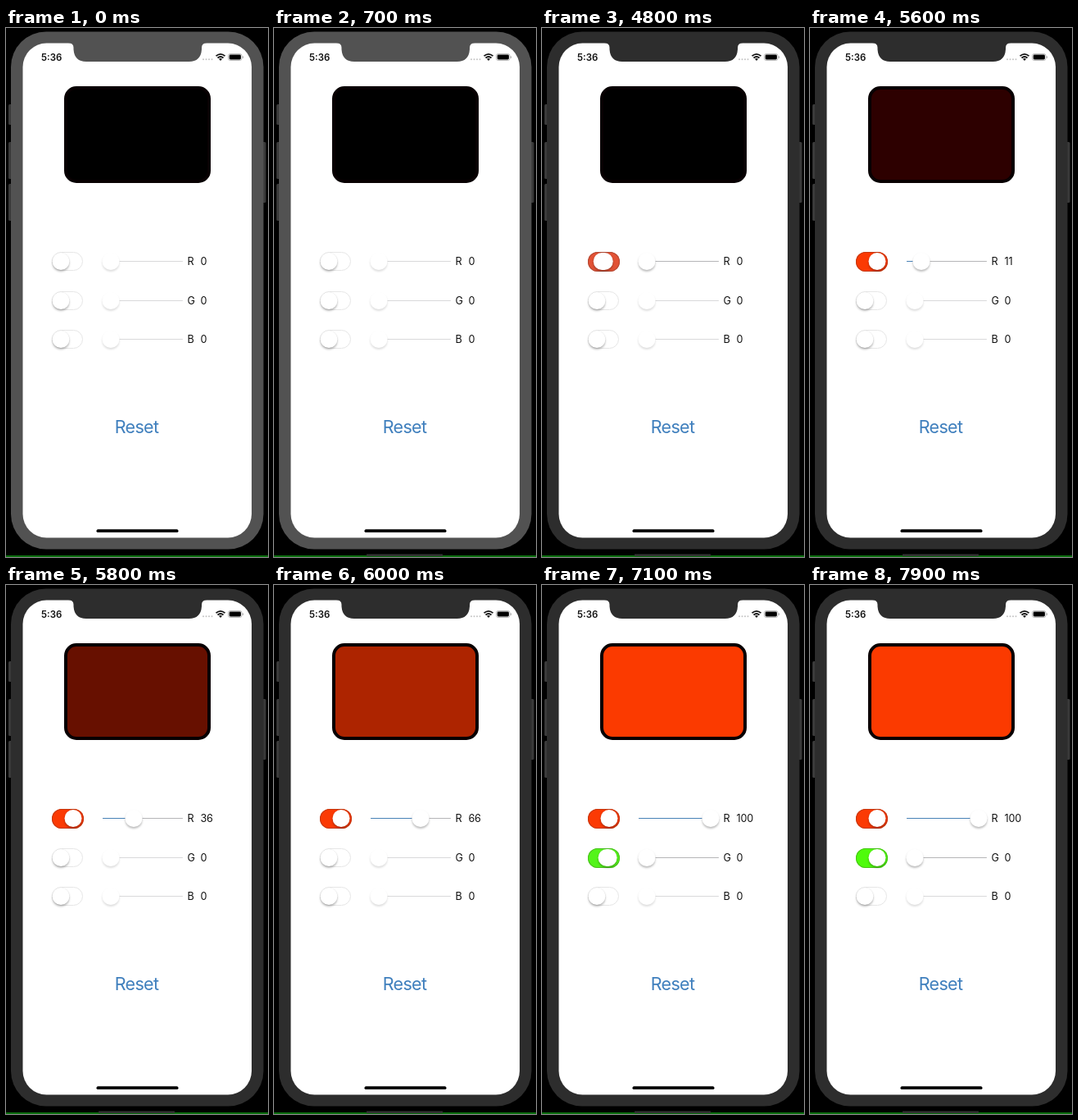
Write an HTML page without scripts that moves like this. It is 320 by 645 pixels and loops after 8 s.

```html
<!DOCTYPE html>
<html lang="en">
<head>
<meta charset="utf-8">
<title>Colour mixer</title>
<style>
/* --v: slider value, --p: switch progress */
@property --v { syntax: "<integer>"; inherits: true; initial-value: 0; }
@property --p { syntax: "<number>"; inherits: true; initial-value: 0; }

html, body { margin: 0; width: 100%; height: 100%; overflow: hidden; background: #000; }
.stage {
  position: relative; width: 320px; height: 645px; overflow: hidden;
  font-family: Inter, Roboto, "Liberation Sans", sans-serif; color: #111;
  animation: drag 8s step-end infinite;
}
.stage *, .stage ::before { position: absolute; box-sizing: border-box; }
svg { left: 0; top: 0; }
.body { animation: dim 8s step-end infinite; }
.dock { animation: appear 8s step-end infinite; }

.time { left: 43px; top: 26px; font-weight: 600; font-size: 11.5px; line-height: 20px; }
.reset {
  left: 20px; width: 279px; top: 471px; text-align: center; color: #3f7fbd;
  font-size: 21.5px; line-height: 30px; letter-spacing: -.7px;
}
.preview {
  left: 70.5px; top: 71px; width: 179px; height: 118px;
  border: 4px solid #080002; border-radius: 15px;
  background: rgb(min(4.1 * var(--v), 19.4 + 2.32 * var(--v)) max(0, .65 * (var(--v) - 11)) 0);
}

.row { left: 0; width: 320px; height: 23px; }
.r { top: 273px; --c: #fb3a04; animation: red 8s step-end infinite; }
.g { top: 321px; --c: #4ffb0c; --v: 0; animation: green 8s step-end infinite; }
.b { top: 368px; --c: #04f; --v: 0; }

.switch { left: 56px; top: 0; width: 38px; height: 23px; border-radius: 12px; border: 1.5px solid #e6e6e6; }
.fill {
  inset: -1.5px; border-radius: 12px; opacity: min(1, 4 * var(--p));
  --tone: color-mix(in srgb, var(--c) calc(50% + 50% * var(--p)), #969ac8);
  background: var(--tone);
  box-shadow: inset 0 0 0 1px color-mix(in srgb, var(--tone) 72%, #333);
}
.knob { border-radius: 11px; background: #fff; height: 21px; width: 21px; transform: translateX(-50%); }
.switch .knob {
  top: -.5px; left: calc(10px + 15px * var(--p));
  width: calc(21px + 14px * var(--p) * (1 - var(--p)));
  box-shadow: 0 2px 2.5px #0004, 0 0 1px #0002;
}
.slider { left: 118px; top: 0; width: 98px; height: 23px; opacity: min(1, .5 + var(--p)); --x: calc(9.5px + .785px * var(--v)); }
.rail, .done { left: 0; top: 10.7px; height: 1.6px; border-radius: 1px; }
.rail { width: 98px; background: #b5b5b7; }
.done { width: var(--x); background: #4781b6; }
.slider .knob { left: var(--x); top: 1px; box-shadow: 0 2px 2.5px #0004; }
.name, .num { top: 0; font-size: 12.6px; line-height: 23px; }
.name { left: 221.5px; }
.num { left: 237.5px; letter-spacing: -.2px; }
.num::before { left: 0; counter-reset: n var(--v); content: counter(n); }

@keyframes dim { 0% { fill: #525252; } 28.75%, 100% { fill: #2d2d2d; } }
@keyframes appear { 0% { opacity: 0; } 7.5%, 100% { opacity: 1; } }
@keyframes red {
  0% { --p: 0; } 60% { --p: .5; } 61.25% { --p: .85; } 62.5%, 100% { --p: 1; }
}
@keyframes green {
  0% { --p: 0; } 87.5% { --p: .5; } 88.75% { --p: .85; } 90%, 100% { --p: 1; }
}
@keyframes drag {
  0% { --v: 0; } 70% { --v: 11; } 71.25% { --v: 23; } 72.5% { --v: 36; }
  73.75% { --v: 50; } 75% { --v: 66; } 76.25% { --v: 84; } 77.5%, 100% { --v: 100; }
}
</style>
</head>
<body>
<div class="stage">
  <svg width="320" height="645" viewBox="0 0 320 645">
    <g fill="#3a3a3a">
      <rect x="3" y="93" width="6" height="25" rx="1.5"/>
      <rect x="3" y="139" width="6" height="45" rx="1.5"/>
      <rect x="3" y="190" width="6" height="45" rx="1.5"/>
      <rect x="311" y="139" width="6.5" height="74" rx="1.5"/>
    </g>
    <rect class="body" x="6" y="4.5" width="308.5" height="631" rx="43"/>
    <rect x="20.5" y="18.5" width="279.5" height="603" rx="29" fill="#fff"/>
    <path class="body" d="M76 18Q82.500 18.500 82.500 24V26Q83.500 41 98 41H223.500Q238 41 239 26V24Q239 18.500 245.500 18Z"/>
    <g fill="#c4c4c4">
      <circle cx="241" cy="38.300" r="1"/><circle cx="244.500" cy="38.300" r="1"/>
      <circle cx="248" cy="38.300" r="1"/><circle cx="251.500" cy="38.300" r="1"/>
    </g>
    <g fill="none" stroke="#111" stroke-width="1.700">
      <path d="M256.500 34.200Q262 29.500 267.500 34.200M258.500 36.500Q262 33.500 265.500 36.500"/>
    </g>
    <path d="M260 37.800Q262 36.300 264 37.800L262 40Z" fill="#111"/>
    <rect x="271.500" y="31.500" width="16.500" height="8" rx="2.300" fill="none" stroke="#aaa" stroke-width=".8"/>
    <rect x="272.700" y="32.600" width="14.200" height="5.800" rx="1.300" fill="#000"/>
    <rect x="288.800" y="34.200" width="1.200" height="2.600" rx=".6" fill="#aaa"/>
    <rect x="110.500" y="611.300" width="100" height="3.700" rx="1.850" fill="#000"/>
    <rect y="643" width="320" height="2" fill="#0a6e0e"/>
    <rect class="dock" x="113" y="641.500" width="93" height="2.500" fill="#333"/>
  </svg>

  <div class="time">5:36</div>
  <div class="preview"></div>

  <div class="row r">
    <div class="switch"><i class="fill"></i><i class="knob"></i></div>
    <div class="slider"><i class="rail"></i><i class="done"></i><i class="knob"></i></div>
    <span class="name">R</span><span class="num"></span>
  </div>
  <div class="row g">
    <div class="switch"><i class="fill"></i><i class="knob"></i></div>
    <div class="slider"><i class="rail"></i><i class="done"></i><i class="knob"></i></div>
    <span class="name">G</span><span class="num"></span>
  </div>
  <div class="row b">
    <div class="switch"><i class="fill"></i><i class="knob"></i></div>
    <div class="slider"><i class="rail"></i><i class="done"></i><i class="knob"></i></div>
    <span class="name">B</span><span class="num"></span>
  </div>

  <div class="reset">Reset</div>
</div>
</body>
</html>
```
